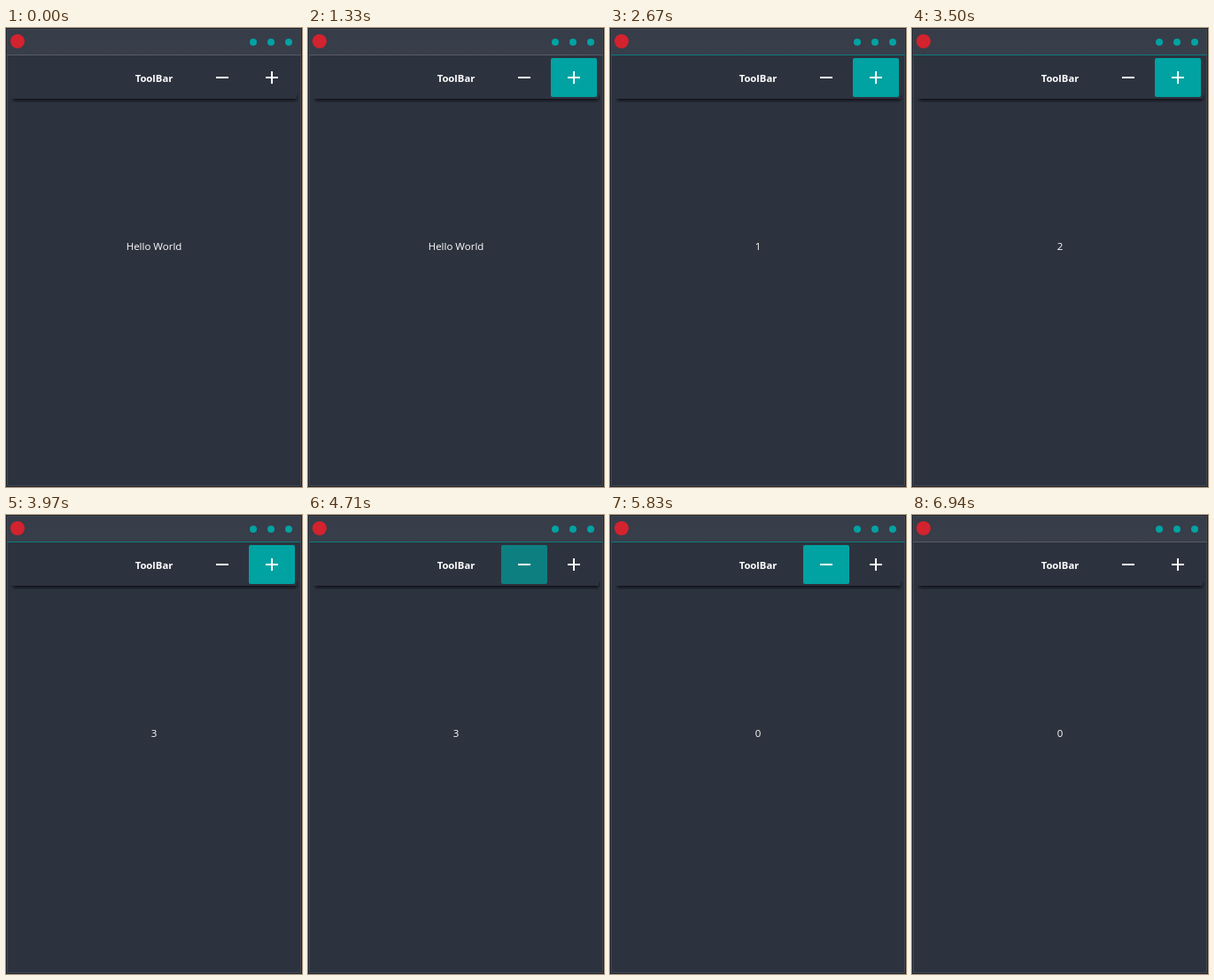
An HTML page for the animation above (7040 ms loop, 334 by 519 pixels).

```html
<!DOCTYPE html>
<html lang="en">
<head>
<meta charset="utf-8">
<title>ToolBar counter</title>
<style>
  html, body { margin: 0; width: 100%; height: 100%; overflow: hidden; background: #2d333e; }
  svg { display: block; }
  text { font: 11.5px "Open Sans", "Noto Sans", sans-serif; fill: #fff; text-anchor: middle; }
  .title { font-size: 11.3px; font-weight: 700; }
</style>
</head>
<body>
<svg width="334" height="519" viewBox="0 0 334 519">
  <defs>
    <linearGradient id="bar" x2="0" y2="1">
      <stop stop-color="#363c48"/>
      <stop offset="1" stop-color="#383e4a"/>
    </linearGradient>
    <filter id="blur" x="-10%" y="-200%" width="120%" height="500%">
      <feGaussianBlur stdDeviation="1.8"/>
    </filter>
  </defs>

  <!-- window -->
  <rect width="334" height="519" fill="#1f242c"/>
  <rect x="1" y="1" width="332" height="517" fill="#414752"/>
  <rect x="2" y="2" width="330" height="515" fill="#2d333e"/>
  <rect x="2" y="2" width="330" height="28" fill="url(#bar)"/>
  <rect id="line" x="1" y="30" width="332" height="1"/>
  <circle cx="13" cy="15" r="8" fill="#d2232e"/>
  <g fill="#00a2a2">
    <circle cx="279" cy="16" r="4"/>
    <circle cx="299" cy="16" r="4"/>
    <circle cx="319" cy="16" r="4"/>
  </g>

  <!-- toolbar -->
  <rect x="8" y="76" width="320" height="6" fill="#0c0f14" filter="url(#blur)"/>
  <rect x="2" y="31" width="326" height="49" fill="#2d333e"/>
  <rect id="minus" x="218" y="34" width="52" height="44" rx="2"/>
  <rect id="plus" x="274" y="34" width="52" height="44" rx="2"/>
  <path d="M237 56h14M293 56h14M300 49v14" stroke="#fff" stroke-width="2"/>
  <text class="title" x="167" y="61">ToolBar</text>

  <text id="label" x="167" y="251"></text>
</svg>
<script>
const LOOP = 7040;
const FILL = { idle: "none", hover: "#00a2a2", down: "#0e7f81" };
const el = id => document.getElementById(id);

// The last entry [start, value] that has begun
const at = (track, t) => track.filter(([start]) => start <= t).pop()[1];

const plus = [
  [0, "idle"], [1330, "hover"], [2530, "down"], [2670, "hover"],
  [3400, "down"], [3500, "hover"], [3870, "down"], [3970, "hover"], [4240, "idle"]
];
const minus = [
  [0, "idle"], [4240, "hover"], [4710, "down"], [4810, "hover"],
  [5180, "down"], [5320, "hover"], [5730, "down"], [5830, "hover"], [6260, "idle"]
];
const label = [
  [0, "Hello World"], [2670, "1"], [3500, "2"], [3970, "3"],
  [4810, "2"], [5180, "1"], [5830, "0"]
];
const line = [[0, "#565b65"], [2490, "#0b7b7c"], [6940, "#565b65"]];

function draw() {
  const t = performance.now() % LOOP;
  el("plus").setAttribute("fill", FILL[at(plus, t)]);
  el("minus").setAttribute("fill", FILL[at(minus, t)]);
  el("line").setAttribute("fill", at(line, t));
  el("label").textContent = at(label, t);
  requestAnimationFrame(draw);
}
draw();
</script>
</body>
</html>
```
